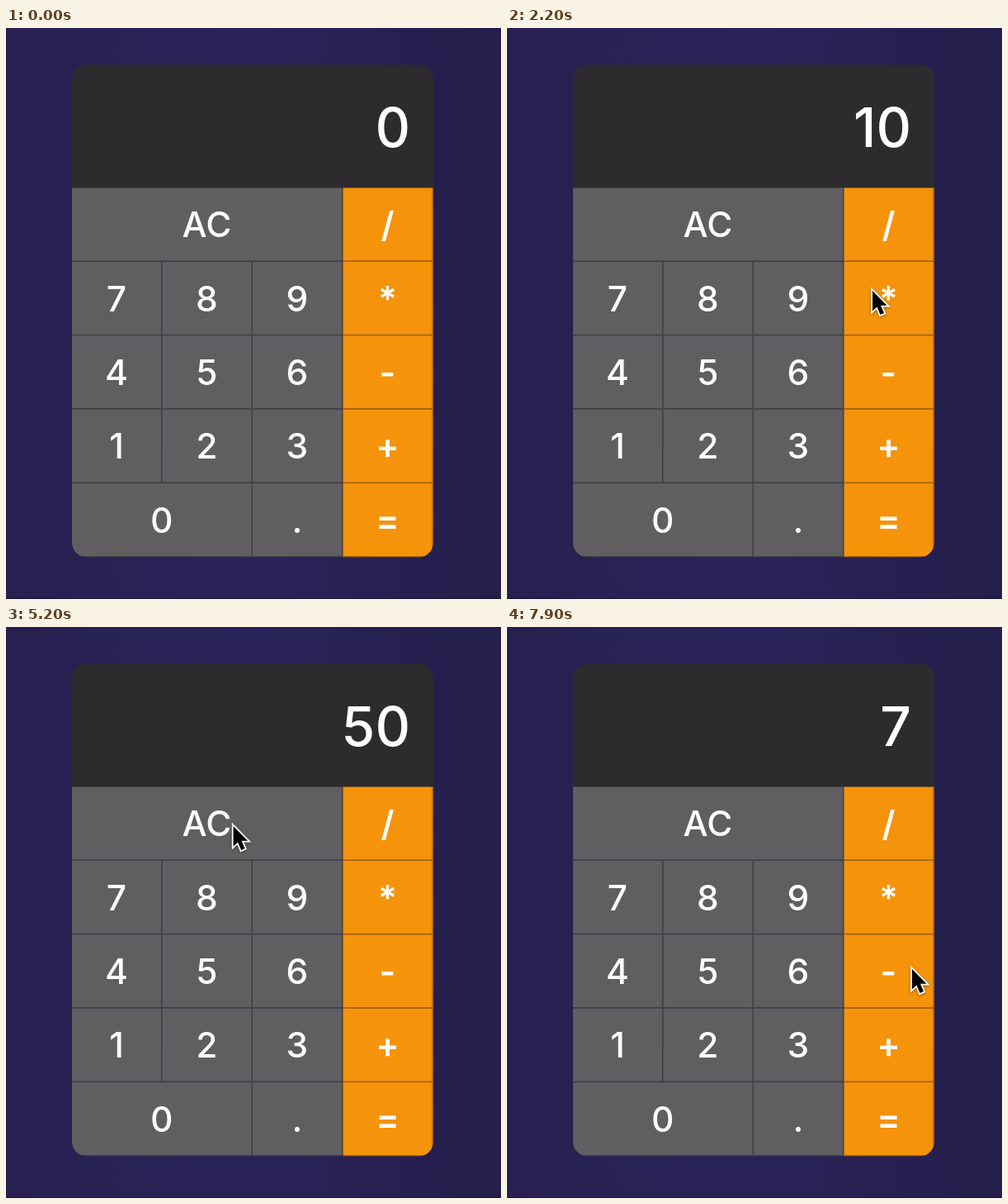
Write an HTML page that moves like this. It is 600 px wide and 691 px high and loops after 8 s.

```html
<!DOCTYPE html>
<html lang="en">
<head>
<meta charset="utf-8">
<title>Calculator</title>
<style>
  html, body { margin: 0; width: 100%; height: 100%; overflow: hidden; }
  body { background: linear-gradient(90deg, #272050, #2a2359 50%, #251f4e 88%, #241e4b); }
  svg { display: block; }
  text { font-family: Inter, "Open Sans", sans-serif; font-weight: 500; fill: #fff; }
  .key text { font-size: 42.5px; text-anchor: middle; }
  .key.operator text { font-weight: 600; }
  .key.pressed { filter: brightness(1.2); }
  #display { font-size: 66px; text-anchor: end; }
</style>
</head>
<body>
<svg width="600" height="691" viewBox="0 0 600 691">
  <clipPath id="card"><rect x="80" y="44.5" width="438" height="596" rx="18"/></clipPath>
  <rect y="690" width="600" height="1" fill="#16122f"/>
  <g clip-path="url(#card)">
    <rect x="80" y="44" width="438" height="150" fill="#2d2b2e"/>
    <text id="display" x="490" y="143.5">0</text>
    <g id="keys"></g>
  </g>
  <path id="cursor" d="M0 0V24.6L5.5 19.4L9.5 29L14 27L10 17.8H17.5Z"
    fill="#000" stroke="#fff" stroke-width="3.6" paint-order="stroke"
    style="filter: drop-shadow(0 1.5px 1.5px rgba(0,0,0,.4))"/>
</svg>
<script>
const LOOP = 8000, STEP = 100;
const COL = 109.5, ROW = 89.4, LEFT = 80, TOP = 193.5;
const display = document.getElementById('display');
const cursor = document.getElementById('cursor');
const keys = {};

function add(parent, tag, attrs) {
  const el = document.createElementNS('http://www.w3.org/2000/svg', tag);
  for (const name in attrs) el.setAttribute(name, attrs[name]);
  return parent.appendChild(el);
}

function addKey(label, col, row, span) {
  const operator = col === 3;
  const x = LEFT + col * COL, y = TOP + row * ROW, w = span * COL;
  const key = add(document.getElementById('keys'), 'g', { class: operator ? 'key operator' : 'key' });
  add(key, 'rect', { x, y, width: w, height: ROW, fill: operator ? '#f5930b' : '#605e61' });
  // right and bottom borders
  add(key, 'path', {
    d: `M${x + w - 0.8} ${y}V${y + ROW - 0.8}H${x}`,
    fill: 'none', stroke: '#000', 'stroke-opacity': 0.32, 'stroke-width': 1.6
  });
  add(key, 'text', { x: x + w / 2 - 0.8, y: y + 59.7 }).textContent = label;
  keys[label] = key;
}

[['AC', '/'], ['7', '8', '9', '*'], ['4', '5', '6', '-'], ['1', '2', '3', '+'], ['0', '.', '=']]
  .forEach((labels, row) => {
    let col = 0;
    for (const label of labels) {
      const span = { AC: 3, 0: 2 }[label] || 1;
      addKey(label, col, row, span);
      col += span;
    }
  });

// departure, arrival, x, y
const moves = [
  [0, 100, 495, 197], [100, 800, 105, 500], [1100, 1300, 169, 594],
  [1600, 1950, 443, 318], [2400, 3000, 260, 410], [3250, 3750, 482.5, 592],
  [4600, 5250, 272, 235], [5700, 6400, 140, 318], [7100, 7700, 491, 414]
];
const presses = [[1000, '1'], [1500, '0'], [2300, '*'], [3900, '='], [5400, 'AC'], [6900, '7'], [7800, '-']];
const values = [[0, '0'], [1100, '1'], [1600, '10'], [3100, '5'], [4000, '50'], [5500, '0'], [7000, '7']];

function cursorAt(t) {
  let [, , x, y] = moves[0];
  for (const [start, end, toX, toY] of moves) {
    const u = Math.min(1, Math.max(0, (t - start) / (end - start)));
    const eased = u * u * (3 - 2 * u);
    x += (toX - x) * eased;
    y += (toY - y) * eased;
  }
  return [x, y];
}

function render(now) {
  const t = Math.floor((now % LOOP) / STEP) * STEP;
  const value = values.filter(([start]) => t >= start).pop()[1];
  if (display.textContent !== value) display.textContent = value;
  for (const [start, label] of presses) keys[label].classList.toggle('pressed', t === start);
  cursor.setAttribute('transform', `translate(${cursorAt(t)})`);
  cursor.setAttribute('visibility', t < 100 ? 'hidden' : 'visible');
}

const origin = performance.now();
function tick() {
  render(performance.now() - origin);
  requestAnimationFrame(tick);
}
tick();
</script>
</body>
</html>
```
